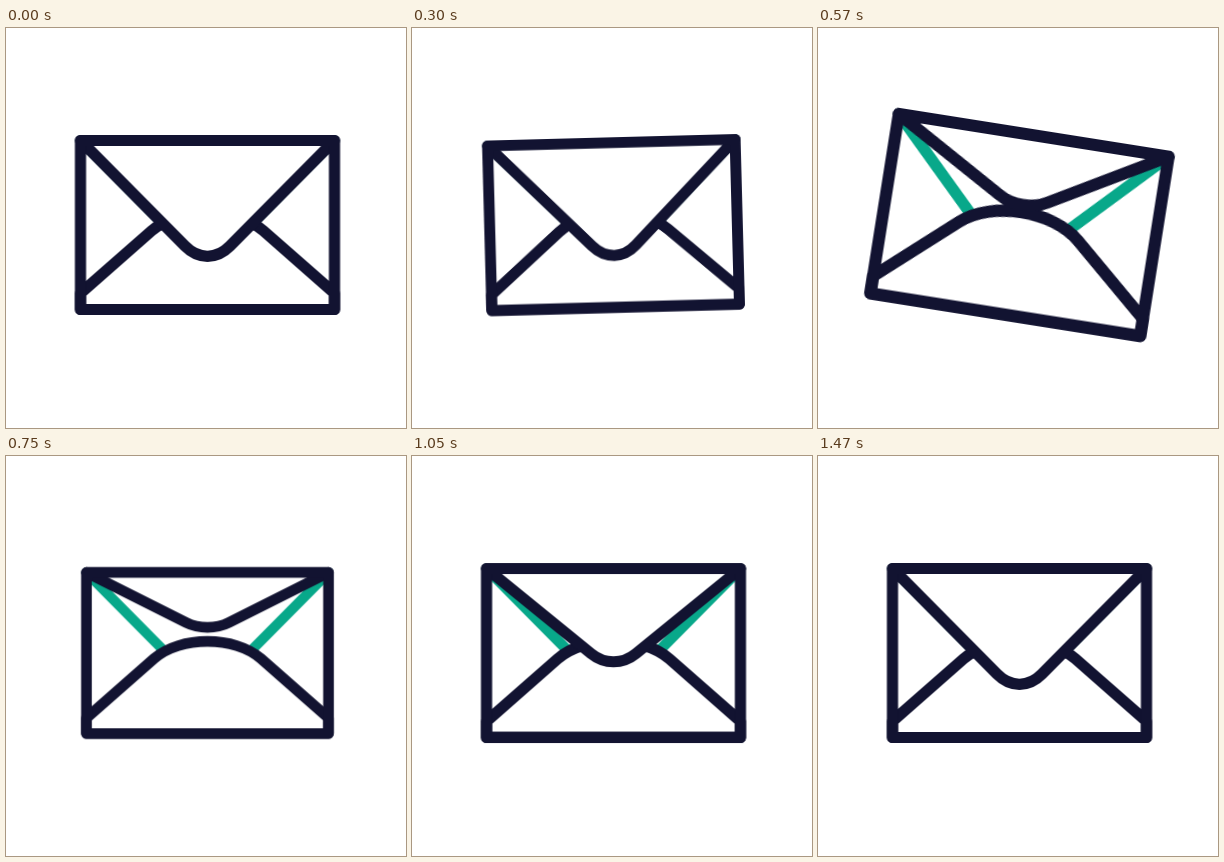
Animation, 400 px wide and 400 px high, one loop 3530 ms. Source, as an HTML page:

```html
<!DOCTYPE html>
<html lang="en">
<head>
<meta charset="utf-8">
<title>Envelope</title>
<style>
  html, body { margin: 0; width: 100%; height: 100%; overflow: hidden; background: #fff; }
  svg { display: block; width: 100%; height: 100%; }
  path {
    fill: #fff;
    stroke: #121331;
    stroke-width: 11.2;
    stroke-linecap: round;
    stroke-linejoin: round;
  }
  .edge { fill: none; }
  .lining { fill: none; stroke: #08a88a; stroke-width: 10.6; }
  .envelope {
    transform-origin: 0 0;
    animation: shake 3530ms cubic-bezier(.6, 0, .4, 1) infinite;
  }
  .flap { animation: flap 3530ms cubic-bezier(.4, 0, .24, 1) infinite; }

  @keyframes shake {
    0% { transform: rotate(0deg) scale(1); }
    3.4% { transform: rotate(-13.8deg) scale(.85); }
    13.6% { transform: rotate(10.8deg) scale(1.1); }
    21.25% { transform: rotate(0deg) scale(.953); }
    30.6%, 100% { transform: rotate(0deg) scale(1); }
  }
  @keyframes flap {
    0%, 8.5%, 41.64%, 100% {
      d: path("M-127 -84.5 L-22.5 21 C-9 34.7 9 34.7 22.5 21 L127 -84.5");
    }
    21.25% {
      d: path("M-127 -84.5 L-22.5 -31.9 C-9 -25.1 9 -25.1 22.5 -31.9 L127 -84.5");
    }
  }
</style>
</head>
<body>
<svg viewBox="0 0 400 400">
  <g transform="translate(201.5 197)">
    <g class="envelope">
      <path class="lining" d="M-127 -84.5 L-22.5 21 C-9 34.7 9 34.7 22.5 21 L127 -84.5"/>
      <path class="pocket" d="M-127 84.5 V68.3 L-56 5.9 C-28.7 -18.1 28.7 -18.1 56 5.9 L127 68.3 V84.5 Z"/>
      <path class="flap" d="M-127 -84.5 L-22.5 21 C-9 34.7 9 34.7 22.5 21 L127 -84.5"/>
      <path class="edge" d="M-127 -84.5 H127 V84.5 H-127 Z"/>
    </g>
  </g>
</svg>
<script>
  // Advance the CSS animations in 30 ms steps.
  const LOOP = 3530, STEP = 30;
  const anims = document.getAnimations();
  anims.forEach(a => a.pause());
  const start = performance.now();

  function tick() {
    const t = (performance.now() - start) % LOOP;
    const time = Math.floor(t / STEP) * STEP;
    anims.forEach(a => { a.currentTime = time; });
    requestAnimationFrame(tick);
  }
  tick();
</script>
</body>
</html>
```
